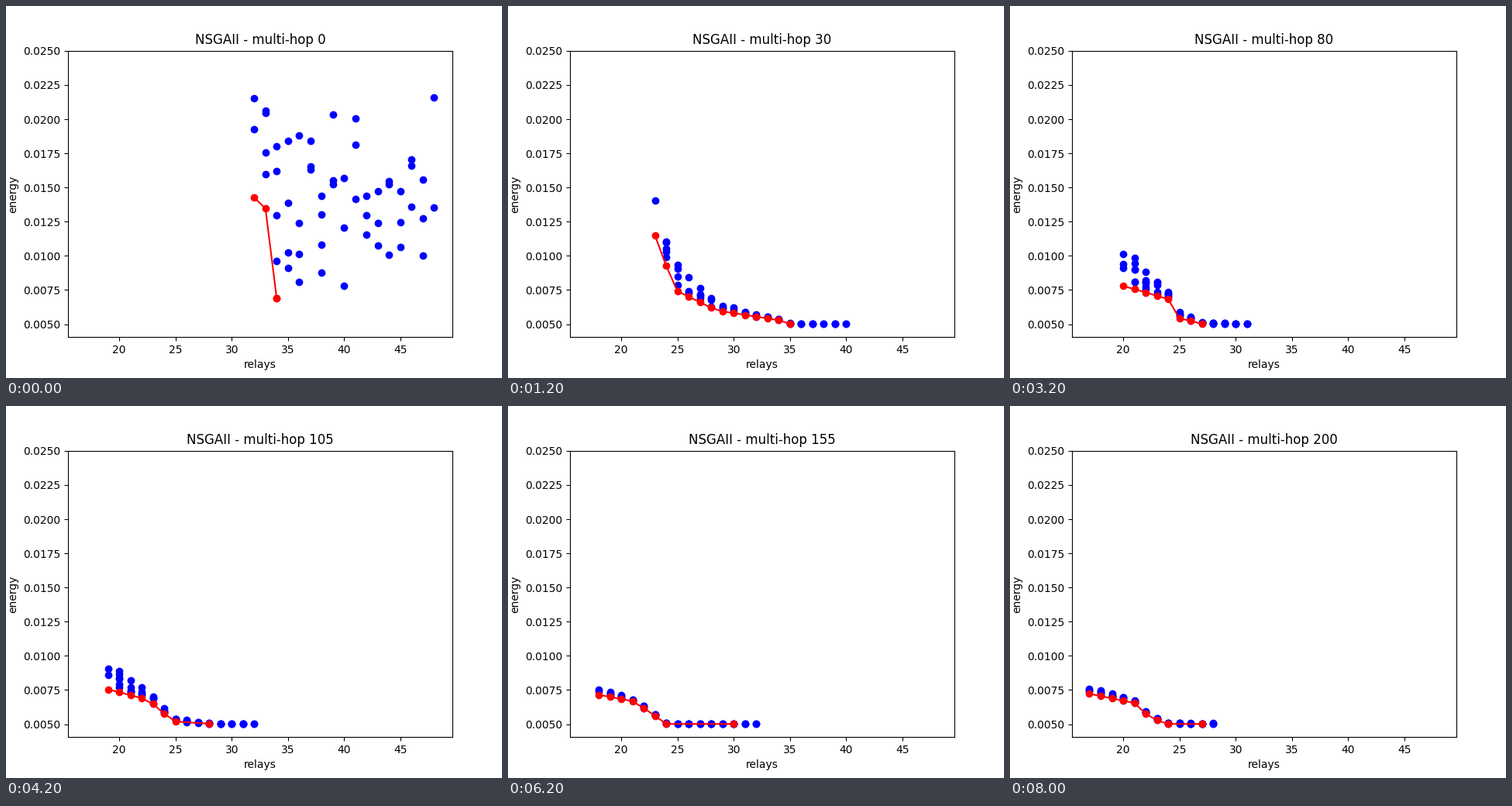
Animation, 640 px wide and 480 px high, one loop 8.2 s. Source, as a matplotlib script:

```python
import numpy as np
import matplotlib.pyplot as plt
from matplotlib.animation import FuncAnimation

FRAMES, INTERVAL, GEN_STEP = 41, 200, 5
UNIT = 1e-4        # energies below are in this unit
HIGHEST = 240
SIZE = 54          # dots in the cloud

# generation: bends of the front, then the cloud's
# (last relay count, height above the front, decay per relay)
STAGES = {
    0: ([(32, 142.6), (33, 134.7), (34, 69), (34, 69), (34, 69)],
        (48, 171, 0)),
    30: ([(23, 115), (24.8, 75), (28.5, 60), (34, 53), (35, 50.2)],
         (40, 60, 0.35)),
    50: ([(22, 78.6), (25, 62.7), (27, 60.4), (29, 50.8), (31, 50.2)],
         (36, 25, 0.22)),
    80: ([(20, 78), (24, 68.4), (25, 54.2), (26, 52.5), (27, 50.2)],
         (31, 55, 0.45)),
    135: ([(18, 72.3), (21, 66.7), (22, 66.6), (24, 50.2), (30, 50.2)],
          (33, 12, 0.3)),
    175: ([(17, 72.3), (21, 67), (23, 51.9), (24, 50.2), (29, 50.2)],
          (31, 5, 0.4)),
    200: ([(17, 72.3), (21, 65.5), (22.4, 54.5), (24, 50.2), (27, 50.2)],
          (28, 8, 0.25)),
}
GENS = list(STAGES)

# Each dot keeps its place along the cloud and its height within it
rng = np.random.default_rng(7)
along = np.linspace(0.035, 1, SIZE) ** 1.2
height = rng.beta(2, 3, SIZE)


def stage_at(gen):
    """Blend the two stages around a generation."""
    k = min(np.searchsorted(GENS, gen, side="right") - 1, len(GENS) - 2)
    t = (gen - GENS[k]) / (GENS[k + 1] - GENS[k])
    if k == 0:
        t = 1 - (1 - t) ** 2   # fast gains at the start
    before, after = STAGES[GENS[k]], STAGES[GENS[k + 1]]
    return [np.array(a) * (1 - t) + np.array(b) * t
            for a, b in zip(before, after)]


def evolve(gen):
    """Front and cloud as (relays, energy) pairs."""
    bends, (last, spread, decay) = stage_at(gen)

    def lowest(relays):
        return np.interp(relays, *bends.T)

    first, *_, corner, end = bends[:, 0].round().astype(int)
    front = np.array([*range(first, corner + 1), end])
    cloud = (first + along * (last - first)).round()
    excess = spread * height * np.exp(-decay * (cloud - first))
    energy = np.minimum(lowest(cloud) + excess, HIGHEST)
    return (front, lowest(front) * UNIT), (cloud, energy * UNIT)


fig, ax = plt.subplots(figsize=(6.4, 4.8), dpi=100)
dots, = ax.plot([], [], "bo")
front_line, = ax.plot([], [], "ro-")
ax.set(xlim=(15.45, 49.62), ylim=(0.0040575, 0.0250125),
       xlabel="relays", ylabel="energy")
title = ax.set_title("")


def update(i):
    gen = i * GEN_STEP
    front, cloud = evolve(gen)
    front_line.set_data(*front)
    dots.set_data(*cloud)
    title.set_text(f"NSGAII - multi-hop {gen}")
    return dots, front_line, title


anim = FuncAnimation(fig, update, frames=FRAMES, interval=INTERVAL,
                     repeat=True, repeat_delay=0)
plt.show()
```
